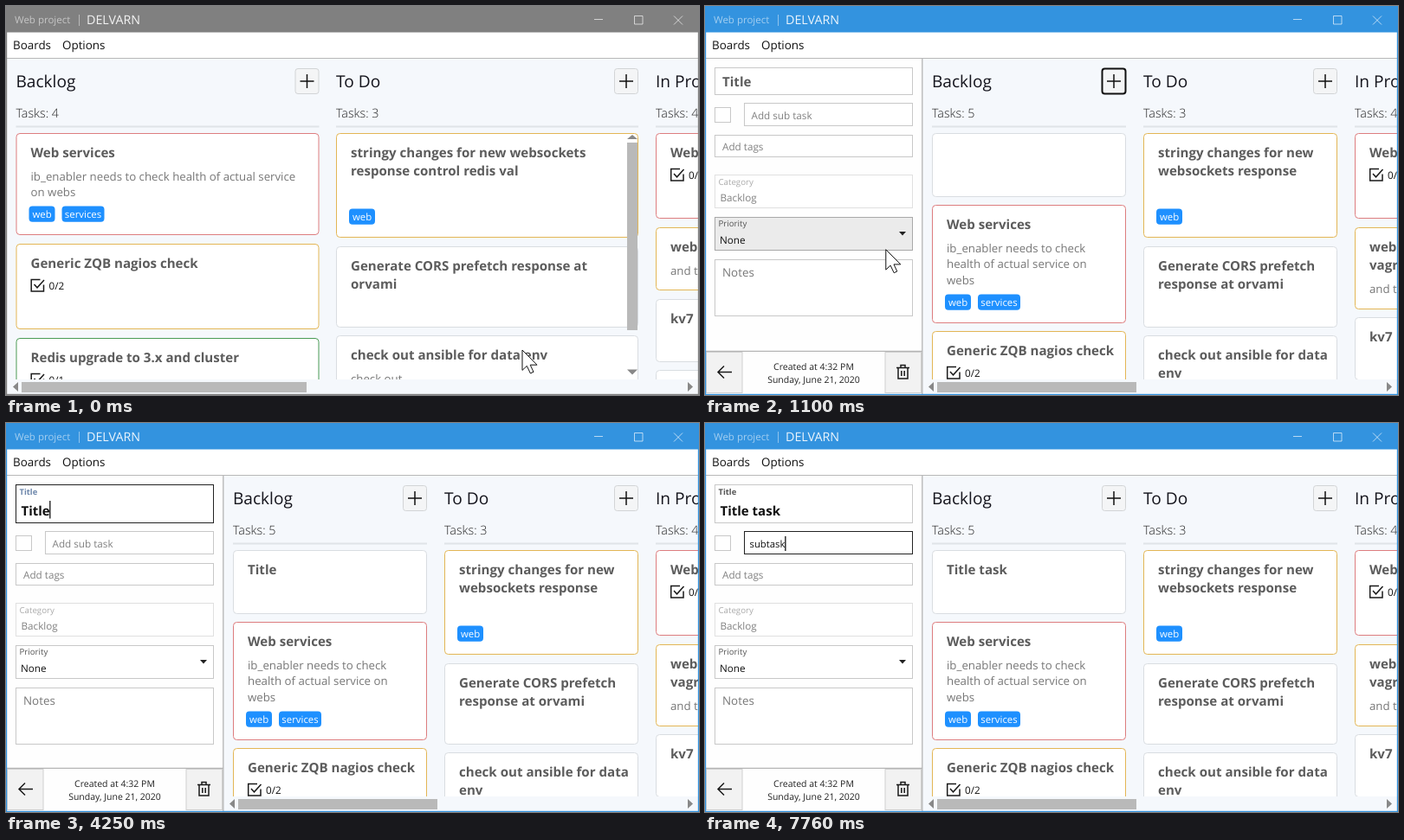
An HTML page that plays this animation: 800 px wide and 450 px high, repeating every 8000 ms.

```html
<!DOCTYPE html>
<html lang="en">
<head>
<meta charset="utf-8">
<title>Task board</title>
<style>
  html, body { margin: 0; width: 100%; height: 100%; overflow: hidden; background: #f5f8fc; }
  svg { display: block; width: 800px; height: 450px; }
  text { font: 11.7px "Open Sans", "Noto Sans", sans-serif; white-space: pre; text-rendering: geometricPrecision; fill: #111; }
  .app { font-size: 14.3px; fill: #fff; fill-opacity: .9; }
  .doc { font-size: 11.5px; fill: #fff; fill-opacity: .55; }
  .menu { font-size: 13.4px; }
  .head { font-size: 19.1px; fill: #14141c; }
  .count { font-size: 14.3px; font-weight: 300; fill: #222; }
  .title { font-size: 15.1px; font-weight: 700; fill: #5c5c5c; }
  .desc { font-size: 13.25px; fill: #777; }
  .tag { font-size: 11.4px; fill: #fff; text-anchor: middle; }
  .hint { fill: #808080; }
  .notes { font-size: 13.4px; fill: #777; }
  .label { font-size: 9.7px; fill: #555; }
  .dim { fill: #aaa; }
  .float { font-size: 9.4px; font-weight: 700; }
  .typed { font-size: 15px; font-weight: 700; }
  .sub { font-size: 11.3px; }
  .stamp { font-size: 10.5px; text-anchor: middle; fill: #222; }
  .grey { fill: #b9b9b9; }
  .arrow { fill: #888; }
  .icon { fill: none; stroke: #1a1a1a; stroke-width: 1.5; }
  .field { fill: #fff; stroke: #c8c8c8; }
  .plus { fill: #f4f5f6; stroke: #d2d4d6; }
</style>
</head>
<body>
<svg id="stage" viewBox="0 0 800 450"></svg>
<script>
const LOOP = 8000;
const RED = '#dd7d7f', AMBER = '#e3b655', GREEN = '#4a9b55', PLAIN = '#d9dde1';
const TAG_WIDTH = { web: 30, services: 49 };

const text = (x, y, s, cls, attrs = '') => `<text x="${x}" y="${y}" class="${cls}" ${attrs}>${s}</text>`;
const rect = (x, y, w, h, attrs) => `<rect x="${x}" y="${y}" width="${w}" height="${h}" ${attrs}/>`;
const path = (d, attrs) => `<path d="${d}" ${attrs}/>`;
const field = (x, y, w, h, id = '', attrs = '') =>
  rect(x + .5, y + .5, w, h, `class="field" ${id && `id="${id}"`} ${attrs}`);

function checkIcon(x, y) {
  return path(`M${x + 15} ${y + 7}V${y + 14.5}H${x + .7}V${y + .8}H${x + 11}M${x + 4} ${y + 6.5}l3.5 3.7L${x + 15.5} ${y + 1.5}`, 'class="icon"');
}

function card(x, w, [y, h, color, titles, { desc = [], tags = [], check, id } = {}]) {
  let out = rect(x + .5, y - .5, w - 1, h, `rx="4" fill="#fff" stroke="${color}"`);
  titles.forEach((s, i) => out += text(x + 17, y + 26.6 + 21 * i, s, 'title', id ? `id="${id}"` : ''));
  const descY = y + 53.6 + 21 * (titles.length - 1);
  desc.forEach((s, i) => out += text(x + 17, descY + 18.7 * i, s, 'desc'));
  if (check) out += checkIcon(x + 17, y + 39.6) + text(x + 38, y + 52.2, check, '');
  let tagX = x + 15;
  for (const tag of tags) {
    const tw = TAG_WIDTH[tag];
    out += rect(tagX, y + h - 33.5, tw, 18.3, 'rx="4" fill="#1e90ff"')
         + text(tagX + tw / 2, y + h - 20.3, tag, 'tag');
    tagX += tw + 8;
  }
  return out;
}

function column(x, w, name, count, cards, id) {
  const bx = x + w - 28, cx = bx + 14;
  return text(x, 94, name, 'head')
    + rect(bx + .5, 72.5, 27, 29, `rx="3" class="plus" id="${id}"`)
    + path(`M${cx - 8} 87h16M${cx} 79v16`, 'stroke="#111" stroke-width="1.5"')
    + text(x, 129.3, 'Tasks: ' + count, 'count')
    + rect(x, 138.5, w, 2, 'fill="#dfe4e8"')
    + cards.map(c => card(x, w, c)).join('');
}

function vScroll(id, x, bottom) {
  return `<g id="${id}">` + rect(x, 158, 12, bottom - 158, 'class="grey"')
    + path(`M${x} 154l6-5 6 5zM${x} 420.5l6 6 6-6z`, 'class="arrow"') + '</g>';
}

function hScroll(x, thumb) {
  return rect(x, 432, 800 - x, 18, 'fill="#f5f8fc"')
    + path(`M${x + 13} 435v11l-6-5.5zM787 435v11l6-5.5z`, 'class="arrow"')
    + rect(x + 17, 435, thumb, 12, 'class="grey"');
}

const services = ['Web services'], zone = 'kv7';

const wide = column(11.5, 350, 'Backlog', 4, [
    [148, 117, RED, services, { desc: ['ib_enabler needs to check health of actual service', 'on webs'], tags: ['web', 'services'] }],
    [276, 98, AMBER, ['Generic ZQB nagios check'], { check: '0/2' }],
    [385, 98, GREEN, ['Redis upgrade to 3.x and cluster'], { check: '0/1' }],
  ], 'addWide')
  + column(381, 349, 'To Do', 3, [
    [148, 120, AMBER, ['stringy changes for new websockets', 'response control redis val'], { tags: ['web'] }],
    [279, 93, PLAIN, ['Generate CORS prefetch response at', 'orvami']],
    [382, 98, PLAIN, ['check out ansible for data env'], { desc: ['check out'] }],
  ], 'addTodo')
  + column(750, 349, 'In Progress', 4, [
    [148, 98, RED, services, { check: '0/2' }],
    [257, 72, AMBER, ['web vagrant'], { desc: ['and tests'] }],
    [340, 72, PLAIN, [zone]],
    [422, 72, PLAIN, ['']],
  ], 'addDoing')
  + vScroll('todoScroll', 717, 375) + vScroll('backlogScroll', 348, 305)
  + hScroll(1, 329);

const slim = column(262, 224, 'Backlog', 5, [
    [148, 73, PLAIN, [''], { id: 'newTitle' }],
    [231, 136, RED, services, { desc: ['ib_enabler needs to check', 'health of actual service on', 'webs'], tags: ['web', 'services'] }],
    [377, 98, AMBER, ['Generic ZQB nagios check'], { check: '0/2' }],
  ], 'addSlim')
  + column(506, 224, 'To Do', 3, [
    [148, 120, AMBER, ['stringy changes for new', 'websockets response'], { tags: ['web'] }],
    [279, 93, PLAIN, ['Generate CORS prefetch', 'response at orvami']],
    [382, 98, PLAIN, ['check out ansible for data', 'env']],
  ], 'addTodoSlim')
  + column(750, 224, 'In Progress', 4, [
    [148, 98, RED, services, { check: '0/2' }],
    [257, 94, AMBER, ['web', 'vagrant'], { desc: ['and tests'] }],
    [361, 72, PLAIN, [zone]],
  ], 'addDoingSlim')
  + vScroll('slimScroll', 473, 275)
  + hScroll(251, 230);

const panel = rect(1, 61, 250, 389, 'fill="#fefefe"')
  + path('M250.8 61V449', 'stroke="#b4b4b4" stroke-width="1.3"')
  + field(11, 71, 228, 31, 'titleBox')
  + text(20, 93.3, 'Title', 'title', 'id="titleHint"')
  + text(15.5, 82.7, 'Title', 'float', 'id="titleLabel"')
  + text(17.5, 106.5, '', 'typed', 'id="titleText"')
  + '<g id="lower">'
  + field(11, 117, 18, 17)
  + field(45, 112, 194, 26, 'subBox')
  + text(53.5, 130.5, 'Add sub task', 'hint', 'id="subHint"')
  + text(51.5, 130.5, '', 'sub', 'id="subText"')
  + field(11, 149, 228, 25) + text(20, 166.5, 'Add tags', 'hint')
  + field(11, 195, 228, 38, '', 'style="stroke:#e0e0e0"')
  + text(15.5, 206.5, 'Category', 'label dim') + text(17.5, 226, 'Backlog', 'hint')
  + field(11, 244, 228, 38, 'priority')
  + text(15.5, 255.3, 'Priority', 'label') + text(17, 275.2, 'None', '')
  + path('M224 261h8l-4 4.5z', 'fill="#222"')
  + field(11, 293, 228, 65) + text(20, 313.2, 'Notes', 'notes')
  + '</g>'
  + path('M1 399.3H251', 'stroke="#b4b4b4" stroke-width="1.3"')
  + rect(1.5, 400.5, 41.5, 47, 'fill="#f2f2f2" stroke="#d0d0d0"')
  + rect(208, 400.5, 41.5, 47, 'fill="#f2f2f2" stroke="#d0d0d0"')
  + path('M31 423.5H15M22 416.5l-7 7 7 7', 'class="icon"')
  + path('M221 418.5h15M226 418v-2.5h5v2.5M223 419v12h11v-12M226.8 422v6M230.2 422v6', 'class="icon"')
  + text(125.5, 420.5, 'Created at 4:32 PM', 'stamp')
  + text(125.5, 435.5, 'Sunday, June 21, 2020', 'stamp');

const frame = rect(0, 0, 800, 30.5, 'id="bar"')
  + rect(.5, .5, 799, 449, 'id="edge" fill="none" stroke-width="1.4"')
  + text(10, 20.4, 'Web project', 'doc')
  + path('M84.5 10v13', 'stroke="#fff" stroke-opacity=".45"')
  + text(93, 21.4, 'DELVARN', 'app')
  + path('M679 15.5h10M725.5 11.5h9.5v9.5h-9.5zM771 11.5l10 10M781 11.5l-10 10', 'fill="none" stroke="#fff" stroke-opacity=".65"');

document.getElementById('stage').innerHTML =
  rect(0, 0, 800, 450, 'fill="#f5f8fc"')
  + `<g id="wide">${wide}</g><g id="slim">${slim}${panel}</g>`
  + rect(0, 30, 800, 30, 'fill="#fff"') + path('M0 60.5H800', 'stroke="#b8b8b8"')
  + text(8, 50.4, 'Boards', 'menu') + text(65, 50.4, 'Options', 'menu')
  + frame
  + path('', 'id="caret" stroke="#111" stroke-width="1.3"')
  + path('M0 0V23.4L5.3 18.4L9.4 27L13 25.3L9.2 17.2H17Z', 'id="pointer" fill="#fff" stroke="#111"')
  + path('M-3 -9h2.5M.5 -9h2.5M0 -8.5v17M-3 9h2.5M.5 9h2.5', 'id="beam" stroke="#111" fill="none"');

const el = Object.fromEntries([...document.querySelectorAll('[id]')].map(n => [n.id, n]));
const show = (node, on) => node.style.display = on ? '' : 'none';
const paint = (node, style) => Object.assign(node.style, style);

// Cursor waypoints: time, x, y
const TRACK = [[0, 596, 398], [540, 348.5, 93], [755, 348.5, 94], [865, 318, 142], [1087, 209, 282],
  [1420, 140, 185], [1739, 102.5, 103], [1848, 98, 95], [1957, 95, 91], [6080, 95, 91], [6620, 112, 146]];
const TITLE_KEYS = [3275, 3495, 3705, 3815, 4025, 4465, 5125, 5335, 5445, 5555];
const SUB_KEYS = [7095, 7205, 7315, 7425, 7535, 7645, 7755];
const STEP = 108.7;   // the screen refreshes the cursor in coarse steps
const LABEL_SHIFT = 13;

function cursorAt(t) {
  const i = TRACK.findIndex(k => k[0] > t);
  if (i < 0) return TRACK[TRACK.length - 1].slice(1);
  const [t0, x0, y0] = TRACK[i - 1], [t1, x1, y1] = TRACK[i];
  let p = (t - t0) / (t1 - t0);
  if (i === 1) p = p * p * (3 - 2 * p);
  return [x0 + (x1 - x0) * p, y0 + (y1 - y0) * p];
}

const typedAt = (s, keys, t) => s.slice(0, keys.filter(k => k <= t).length);

function setText(node, s) {
  if (node.textContent !== s) node.textContent = s;
}

function render(t) {
  const [x, y] = cursorAt(Math.floor(t / STEP) * STEP + 1);
  const open = t >= 765, typing = t >= TITLE_KEYS[0];
  const titleFocus = t >= 1960 && t < 6655, subFocus = t >= 6655;
  const inTitle = open && x < 240 && y < 104 && !typing;
  const title = typedAt('Title task', TITLE_KEYS, t), sub = typedAt('subtask', SUB_KEYS, t);

  const accent = t < 655 ? '#808080' : '#3393df';
  el.bar.style.fill = el.edge.style.stroke = accent;
  show(el.wide, !open);
  show(el.slim, open);

  show(el.todoScroll, x > 375);
  show(el.backlogScroll, x <= 375);
  show(el.slimScroll, t < 985);
  el.addWide.style.fill = x < 361 && y < 102 ? '#dcdcdc' : '';
  const ring = t >= 985 && t < 1960;
  paint(el.addSlim, { stroke: ring ? '#111' : '', strokeWidth: ring ? 2 : 1 });

  // Fields move down once the title label floats above its text
  const shift = typing ? LABEL_SHIFT : 0;
  el.lower.setAttribute('transform', `translate(0 ${shift})`);
  el.titleBox.setAttribute('height', 31 + shift);
  el.titleBox.style.stroke = titleFocus ? '#222' : inTitle ? '#888' : '';
  el.subBox.style.stroke = subFocus ? '#222' : '';
  const overPriority = open && x < 240 && y > 244 && y < 283;
  paint(el.priority, { fill: overPriority ? '#ebebeb' : '', stroke: overPriority ? '#a8a8a8' : '' });

  show(el.titleHint, !typing);
  show(el.titleLabel, typing);
  el.titleLabel.style.fill = titleFocus ? '#6d87ab' : '#555';
  setText(el.titleText, title);
  setText(el.newTitle, title);
  setText(el.subText, sub);
  show(el.subHint, !sub);

  const blinkOff = t >= 2405 && t < 2955;
  show(el.caret, (titleFocus || subFocus) && !blinkOff);
  const caretX = subFocus ? 52 + (sub && el.subText.getComputedTextLength())
    : 17.6 + (title && el.titleText.getComputedTextLength());
  const [top, size] = subFocus ? [131, 17] : typing ? [90, 20.5] : [76.5, 21];
  el.caret.setAttribute('d', `M${caretX} ${top}v${size}`);

  const beam = t >= 1845;
  const hidden = (typing && t < 6105) || t >= SUB_KEYS[0];
  show(el.pointer, !beam);
  show(el.beam, beam && !hidden);
  for (const c of [el.pointer, el.beam]) c.setAttribute('transform', `translate(${x} ${y})`);
}

function tick() {
  render(performance.now() % LOOP);
  requestAnimationFrame(tick);
}
tick();
</script>
</body>
</html>
```
